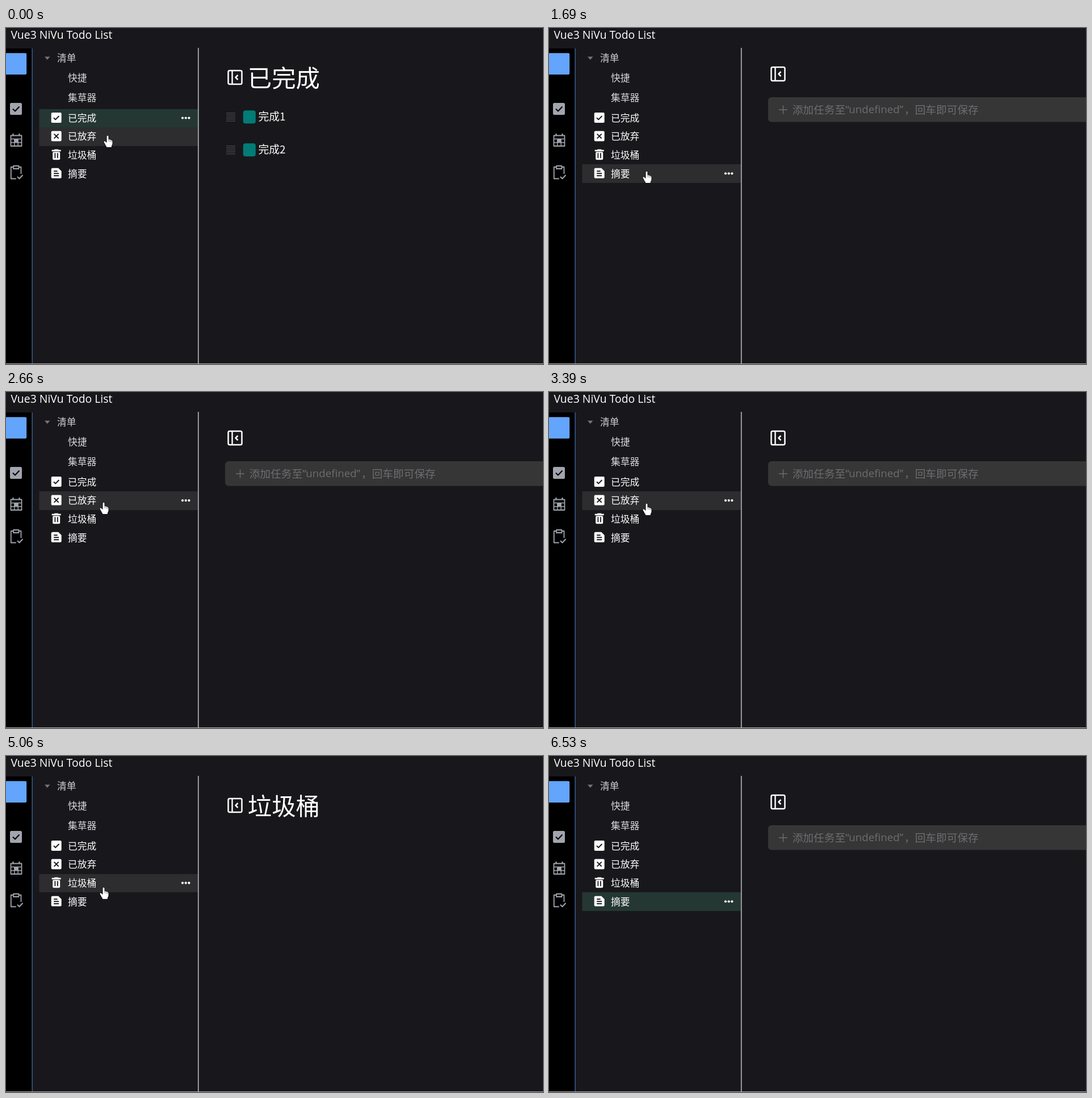
Write an HTML page that moves like this. It is 946x592 px and loops after 6940 ms.

```html
<!DOCTYPE html>
<html lang="zh-CN">
<head>
<meta charset="utf-8">
<title>Todo List</title>
<style>
html, body { margin: 0; width: 100%; height: 100%; overflow: hidden; background: #18181c; }
svg { display: block; width: 946px; height: 592px; }
text { font-family: "Noto Sans CJK SC", "Noto Sans CJK", sans-serif; white-space: pre; }
.latin { font-family: "Open Sans", "Noto Sans", sans-serif; }
</style>
</head>
<body>
<svg id="stage" viewBox="0 0 946 592" xmlns="http://www.w3.org/2000/svg"></svg>
<script>
const LOOP = 6940, STEP = 130;
const ROW_TOP = 142.5, ROW_H = 32.6, LANE = 172;
const names = ['已完成', '已放弃', '垃圾桶', '摘要'];

// Pointer legs: start, end, y reached, click on start, x reached
const CLICK = true;
const legs = [
  [370, 750, 221, CLICK],
  [1050, 1370, 246, CLICK],
  [1530, 1690, 252, CLICK],
  [1690, 1840, 267],
  [1840, 1990, 250],
  [2140, 2270, 225],
  [2400, 2530, 194, CLICK],
  [2660, 3080, 239, CLICK],
  [3080, 3390, 196],
  [3900, 3900, 214],
  [4180, 4470, 225],
  [4470, 4770, 257, CLICK],
  [4770, 5060, 231],
  [5300, 5430, 251],
  [5430, 5830, 195, CLICK],
  [5830, 5830, 195, CLICK],
  [6110, 6110, 250],
  [6250, 6530, 828, CLICK, 1515]
];

const rowAt = y => Math.floor((y - ROW_TOP) / ROW_H);

// The screen refreshes in even steps within each leg
function progress(t, start, end) {
  const n = Math.floor((end - start) / STEP);
  return n && t < end ? Math.floor((t - start) / (end - start) * n + 0.001) / n : 1;
}

function pose(t) {
  let x = 179, y = 189, active = 0;
  for (const [start, end, toY, click, toX = LANE] of legs) {
    if (t < start) break;
    if (click) active = rowAt(y);
    const k = progress(t, start, end);
    x += (toX - x) * k;
    y += (toY - y) * k;
  }
  return { x, y, active };
}

const rect = (x, y, w, h, fill, r = 0) =>
  `<rect x="${x}" y="${y}" width="${w}" height="${h}" rx="${r}" fill="${fill}"/>`;
const line = (d, color, w) =>
  `<path d="${d}" fill="none" stroke="${color}" stroke-width="${w}" stroke-linejoin="round"/>`;
const at = (x, y, body) => `<g transform="translate(${x} ${y})">${body}</g>`;
// CJK text centred vertically on y
const han = (x, y, size, fill, s) =>
  `<text x="${x}" y="${y + size * 0.38}" font-size="${size}" fill="${fill}">${s}</text>`;
const latin = (x, y, size, fill, s) =>
  `<text class="latin" x="${x}" y="${y}" font-size="${size}" fill="${fill}">${s}</text>`;

const GREY = '#a2a5ae', DARK = '#18181c', WHITE = '#fff', INK = '#6d6d70';

function rail() {
  const check = rect(7, 132, 21, 21, GREY, 2.5) + line('M12 142.5l4 4 7.5-8', '#08080a', 2.2);
  const calendar = line('M8.5 189.5h19v18.5h-19z', GREY, 1.8) +
    line('M12.5 186v4M23.5 186v4', GREY, 2.2) +
    line('M8 195.5h20M8 201.8h20M14.8 195v13M21.2 195v13', GREY, 1.5) +
    rect(15, 196, 6, 6, GREY);
  const clip = line('M13 245h-4.2v20.5h9M22 245h4.5v12', GREY, 1.8) +
    line('M13 243h9.5v5H13z', GREY, 1.8) + line('M20 262l3.5 3.5 6-6.5', GREY, 1.9);
  return rect(0, 36, 45.5, 555, '#000') + rect(45.6, 36, 1.1, 555, '#4675b8') +
    rect(-4, 44.3, 40.2, 37.7, '#63a4fc', 2) + check + calendar + clip;
}

const box = rect(-9, -9, 18, 18, WHITE, 2);
const icons = [
  box + line('M-4.7 .2l3.2 3.2 6.2-6.4', DARK, 2),
  box + line('M-4-4l8 8M4-4l-8 8', DARK, 2),
  rect(-8, -8.5, 16, 2.6, WHITE) + rect(-3.5, -9.5, 7, 2, WHITE) +
    rect(-6.5, -5, 13, 14, WHITE, 2) + line('M-2.3-3v9M2.3-3v9', DARK, 1.8),
  '<path d="M-6.5-9H3.5L9-3.5V7Q9 9 7 9H-7Q-9 9-9 7V-7Q-9-9-6.5-9z" fill="#fff"/>' +
    line('M-4.5-3.5H2M-4.5 .5H4.5M-4.5 4.5H4.5', DARK, 2)
];

function sidebar() {
  return '<path d="M68 50.5h9.5l-4.75 5.5z" fill="#77777b"/>' +
    han(90, 52.5, 16.8, '#d0d0d2', '清单') +
    han(109, 88, 16.8, '#d8d8da', '快捷') + han(109, 122.5, 16.8, '#d8d8da', '集草器') +
    names.map((s, i) => {
      const y = 158.5 + ROW_H * i;
      return at(88.7, y - 0.5, icons[i]) + han(109, y, 16.8, WHITE, s);
    }).join('');
}

const panelIcon = y => at(403.5, y,
  '<rect x="-12" y="-12" width="24" height="24" rx="2.5" fill="none" stroke="#fff" stroke-width="2.5"/>' +
  line('M-5-12v24', WHITE, 2.4) + line('M5-4l-4 4 4 4', WHITE, 2.5));

const task = (y, s) =>
  [-2, -1, 0, 1, 2].map(i => rect(388, y + i * 3.5 - 0.6, 16, 1.3, '#4b4b4f')).join('') +
  rect(417.8, y - 11.5, 22, 23, '#027c76', 4) + han(444.5, y - 0.5, 18.8, WHITE, s);

const titled = s => panelIcon(87) + han(425.8, 88.3, 42.4, WHITE, s);
const entry = panelIcon(81) + rect(386, 122, 580, 43.5, '#363637', 6) +
  line('M405 144h15M412.5 136.5v15', INK, 1.5) +
  han(428.7, 143.5, 18.7, INK, '添加任务至') +
  latin(522.3, 150, 18.7, INK, '“undefined”') +
  han(626, 143.5, 18.7, INK, '，回车即可保存');
const views = [
  titled(names[0]) + task(156.8, '完成1') + task(214.8, '完成2'),
  entry, titled(names[2]), entry
];

const hand = '<path d="M-2 2Q-2 0 0 0Q2 0 2 2V7Q3.3 6 4.6 7.6Q6 6.8 7 8.4Q9 8 9 10.5V14.5Q9 17 7.3 19V21.5H-2.5V19.5Q-4 18-5 15.5L-7 12Q-7.5 10-5.7 9.8Q-4 10-2 12.5z" ' +
  'fill="#fff" stroke="#08080a"/>' + line('M2 7v4M4.6 8v3.5M7 9v3', '#55555a', 0.7);

function row(i, hover, active) {
  const top = Math.round(ROW_TOP + ROW_H * i);
  const h = Math.round(ROW_TOP + ROW_H * (i + 1)) - top;
  const fill = i === hover ? '#2d2d30' : i === active ? '#243733' : DARK;
  const dot = d => `<circle cx="${316.7 + d * 5.7}" cy="${158.5 + ROW_H * i}" r="2.1" fill="#fff"/>`;
  return rect(58.5, top, 279.5, h, fill) + (i === active ? [-1, 0, 1].map(dot).join('') : '');
}

const back = rect(0, 0, 946, 592, DARK) + latin(8.5, 19, 19.4, WHITE, 'Vue3 NiVu Todo List') + rail();
const edges = rect(337.9, 35, 1.8, 556, '#a9a9ab') + rect(0, 591, 946, 1, '#b9aeb3');
const side = sidebar();
const stage = document.getElementById('stage');
let shown = '';

function draw(t) {
  const { x, y, active } = pose(t);
  const key = [x, y, active].join();
  if (key === shown) return;
  shown = key;
  const hover = x < 338 ? rowAt(y) : -1;
  stage.innerHTML = back + names.map((_, i) => row(i, hover, active)).join('') +
    side + views[active] + edges + at(x, y, hand);
}

const start = performance.now();
function loop() {
  draw((performance.now() - start) % LOOP);
  requestAnimationFrame(loop);
}
loop();
</script>
</body>
</html>
```
